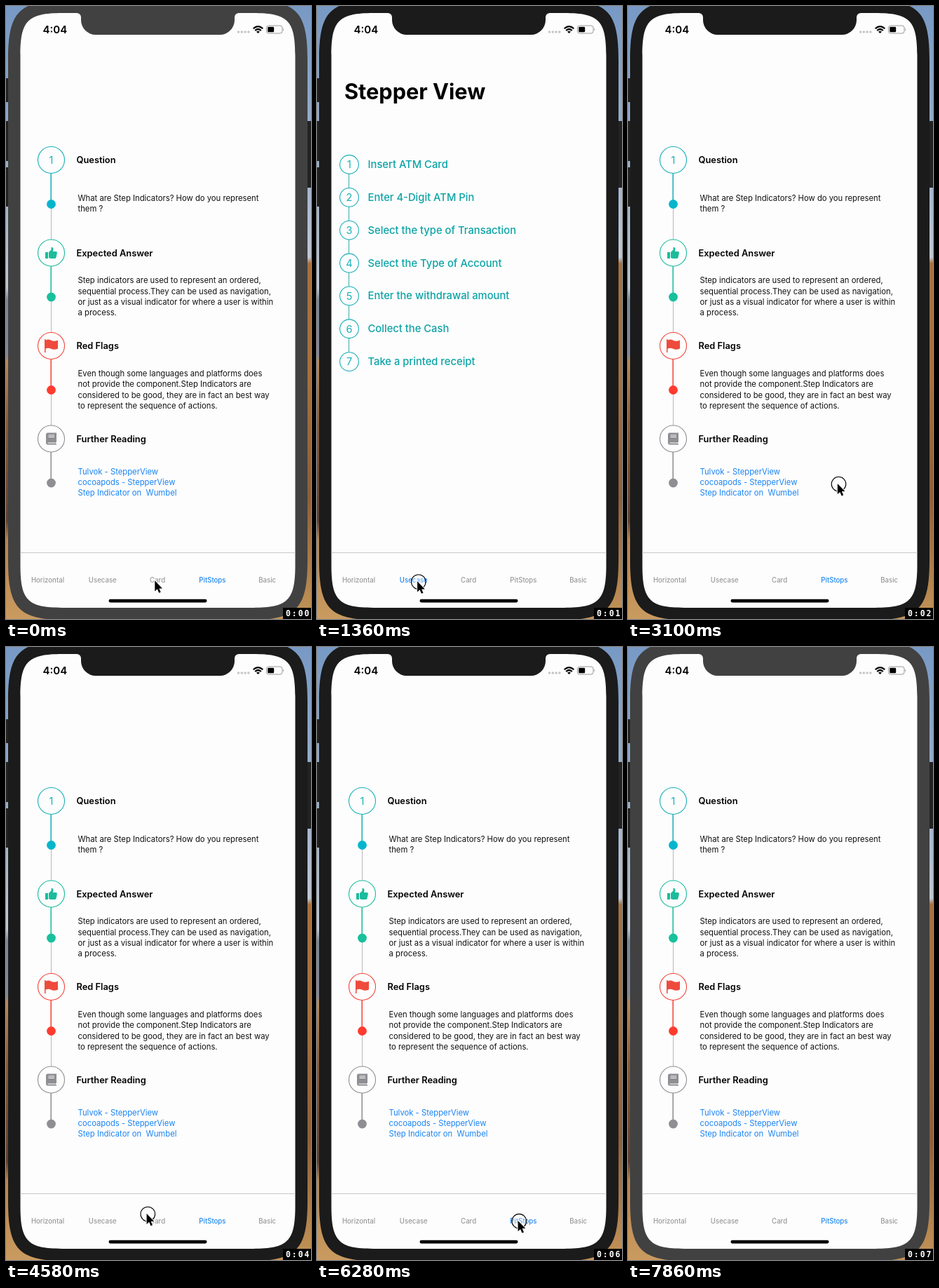
Write an HTML page that moves like this. It is 435 by 874 pixels and loops after 7.92 s.

```html
<!DOCTYPE html>
<html lang="en">
<head>
<meta charset="utf-8">
<title>Step indicator demo</title>
<style>
html, body { margin: 0; width: 100%; height: 100%; overflow: hidden; }
svg { display: block; width: 435px; height: 874px; }
text { font-family: Inter, "Open Sans", sans-serif; white-space: pre; }
.title { font-size: 30.7px; font-weight: 700; }
.label { font-size: 14.75px; font-weight: 500; fill: #0ba3a6; }
.head { font-size: 12.85px; font-weight: 600; }
.body { font-size: 11.28px; fill: #111; }
.link { font-size: 11.28px; fill: #1a84f5; }
.num { font-size: 14.5px; text-anchor: middle; fill: #18b0b8; }
.tab { font-size: 9.65px; font-weight: 500; text-anchor: middle; fill: #999; }
.tab.on { fill: #1d86f3; }
.time { font-size: 15px; font-weight: 600; }
.clock { font: bold 11.5px "DejaVu Sans Mono", monospace; letter-spacing: 1.9px; fill: #fff; }
.line { fill: none; }
</style>
</head>
<body>
<svg viewBox="0 0 435 874" xmlns="http://www.w3.org/2000/svg">
  <defs>
    <linearGradient id="left" x2="0" y2="1">
      <stop offset="0" stop-color="#7799c4"/><stop offset=".3" stop-color="#a0b2ca"/>
      <stop offset=".46" stop-color="#c0c8d3"/><stop offset=".48" stop-color="#7d879a"/>
      <stop offset=".57" stop-color="#858897"/><stop offset=".58" stop-color="#b98a5b"/>
      <stop offset=".68" stop-color="#8a5c38"/><stop offset=".84" stop-color="#5d4030"/>
      <stop offset=".87" stop-color="#b98550"/><stop offset="1" stop-color="#c99b60"/>
    </linearGradient>
    <linearGradient id="right" x2="0" y2="1">
      <stop offset="0" stop-color="#7799c4"/><stop offset=".3" stop-color="#a6b7ce"/>
      <stop offset=".41" stop-color="#bfc8d3"/><stop offset=".42" stop-color="#a7713f"/>
      <stop offset=".6" stop-color="#a8703d"/><stop offset=".8" stop-color="#8e5f38"/>
      <stop offset="1" stop-color="#c39458"/>
    </linearGradient>
  </defs>
  <rect width="218" height="874" fill="url(#left)"/>
  <rect x="217" width="218" height="874" fill="url(#right)"/>
  <path fill="#222" d="M0 103H5V137H0ZM0 164H5V221H0ZM0 230H5V286H0ZM428 164H435V259H428Z"/>
  <g id="bezel">
    <path id="body"/>
    <path id="screen" fill="#fdfdfd"/>
    <path d="M101 9.5V10A6 6 0 0 1 107 16V20A21 21 0 0 0 128 41H305A21 21 0 0 0 326 20V16A6 6 0 0 1 332 10V9.5Z"/>
  </g>
  <text class="time" x="52.5" y="39">4:04</text>
  <g fill="#c6c6c6"><circle cx="331.5" cy="37" r="1.8"/><circle cx="336.3" cy="37" r="1.8"/><circle cx="341.1" cy="37" r="1.8"/><circle cx="345.9" cy="37" r="1.8"/></g>
  <g class="line" stroke="#000" stroke-width="2.2">
    <path d="M352.7 32.2Q359.5 26 366.3 32.2M355.2 35Q359.5 31 363.8 35"/>
    <path d="M357 36.5Q359.5 34.8 362 36.5L359.5 39Z" fill="#000" stroke="none"/>
  </g>
  <rect x="371.5" y="28" width="22.5" height="11" rx="3" fill="none" stroke="#999"/>
  <rect x="373.2" y="29.7" width="9" height="7.6" rx="1.3"/>
  <path d="M395.3 31.5Q397.3 33.5 395.3 35.5Z" fill="#999"/>
  <g id="pages"></g>
  <path d="M20.5 779.5H412.5" stroke="#c9c9c9"/>
  <g id="tabs"></g>
  <rect x="146.5" y="845.8" width="140" height="4.6" rx="2.3"/>
  <g id="cursor">
    <circle id="ring" r="10.3" fill="#fff" fill-opacity=".3" stroke="#000" stroke-width="1.1"/>
    <path d="M-1.7-.7V14.5L1.8 11.3L4.2 16.8L6.7 15.7L4.4 10.4H9Z" stroke="#fff" stroke-width="1.6" paint-order="stroke"/>
  </g>
  <rect x="395" y="858" width="40" height="16"/>
  <text class="clock" id="clock" x="399" y="870"></text>
</svg>
<script>
const $ = id => document.getElementById(id);
const text = (cls, x, y, s) => `<text class="${cls}" x="${x}" y="${y}">${s}</text>`;
const circle = (x, y, r, attrs) => `<circle cx="${x}" cy="${y}" r="${r}" ${attrs}/>`;
const line = (x, y1, y2, color, w = 1) => `<path d="M${x} ${y1}V${y2}" stroke="${color}" stroke-width="${w}"/>`;
const at = (x, y, s) => `<g transform="translate(${x} ${y})">${s}</g>`;

// Rectangle whose corners ease into the sides instead of being plain arcs
function smoothRect(x, y, w, h, r) {
  const e = r * 1.53, k = e * .823, m = e - k;
  return `M${x + e} ${y}h${w - 2 * e}c${k} 0 ${e} ${m} ${e} ${e}v${h - 2 * e}c0 ${k} ${-m} ${e} ${-e} ${e}` +
    `h${2 * e - w}c${-k} 0 ${-e} ${-m} ${-e} ${-e}v${2 * e - h}c0 ${-k} ${m} ${-e} ${e} ${-e}Z`;
}
$("body").setAttribute("d", smoothRect(3, -8, 427, 883.5, 56));
$("screen").setAttribute("d", smoothRect(20.5, 10, 392, 848, 39.3));

// Icons, centred on 0,0
const thumb = `<path fill="#1abc9c" d="M-8.5-1H-4.5V8H-8.5ZM-3.5-1L0-4.5V-8Q3-8.5 3-5L2.4-2H7Q8.8-1.6 8.3.5L7 6.5Q6.6 8 5 8H-1L-3.5 7Z"/>`;
const flag = `<path fill="#ee4b3d" d="M-9.5-9.5H-8V-8Q-4-10 0-7.8T9.5-8V4Q4 6.3 0 4.3T-8 4V9.5H-9.5Z"/>`;
const book = `<path fill="#8e8e93" d="M-5.5-8.5H7.5V5H6.3V7H7.5V8.5H-5Q-7.5 8.5-7.5 5.5V-6Q-7.5-8.5-5.5-8.5Z"/><path d="M-4-5H4.5M-4-2.5H4.5M-5 6H6" stroke="#fdfdfd" stroke-width="1.2"/>`;
const outline = (d, w = 1.1) => `<path class="line" stroke="#12a7ab" stroke-width="${w}" d="${d}"/>`;
const bankCard = outline("M-9-8.5H9Q10-8.5 10-7.5V7.5Q10 8.5 9 8.5H-9Q-10 8.5-10 7.5V-7.5Q-10-8.5-9-8.5ZM-7 2H0M-7 5H-3") +
  `<path fill="#12a7ab" d="M-10-5H10V-1.5H-10Z"/>`;
const receipt = outline("M-6 8V-10.5Q-6-14-9-14T-10.5-9H-6M-9-14H5Q7.5-14 7.5-11V4M-6 8H-10Q-10 13.5-7 13.5H4Q1.5 12 2 8H-6M-3-7H-1M1-7H5M-3-2.5H-1M1-2.5H5M-3 2H-1M1 2H5M10 6.5Q5.5 5.5 6 8T9.5 10T6 13M8 5V14.5");
const cash = outline("M-4-9.5L10-4L7 5L-7-.5ZM-7-.5L-8 2L-2 4.5M6 7L7 5M4-2.2A2.4 2.4 0 1 1-.8-2.2A2.4 2.4 0 1 1 4-2.2" +
  "M-4 5A2.5 2.5 0 1 1-9 5A2.5 2.5 0 1 1-4 5M2 7A2.6 2.6 0 1 1-3.2 7A2.6 2.6 0 1 1 2 7", .75);

function cardPage() {
  const cards = [["Insert ATM Card", bankCard], ["Select transaction and enter pin", receipt],
    ["Collect Cash", cash], ["Select type of Account", cash]];
  return text("title", 39, 133, "StepperView") + line(45.5, 239, 493, "#4ba3aa") +
    cards.map(([label, icon], i) => {
      const y = 239 + i * 84.7;
      return circle(46, y, 5.8, 'fill="#00b4ca"') +
        `<rect class="line" x="63.5" y="${y - 28.5}" width="296" height="57" rx="6.5" stroke="#bdbdbd"/>` +
        at(81, y, icon) + text("label", 101, y + 5, label);
    }).join("");
}

function usecasePage() {
  const steps = ["Insert ATM Card", "Enter 4-Digit ATM Pin", "Select the type of Transaction",
    "Select the Type of Account", "Enter the withdrawal amount", "Collect the Cash", "Take a printed receipt"];
  return text("title", 39, 133, "Stepper View") + line(45.5, 226, 507, "#3fa9ae") +
    steps.map((label, i) => {
      const y = 226 + i * 46.85;
      return circle(46, y, 13.4, 'fill="#fdfdfd" stroke="#18b0b8" stroke-width="1.1"') +
        text("num", 46, y + 5.3, i + 1) + text("label", 72.5, y + 5, label);
    }).join("");
}

function pitStopsPage() {
  const stops = [
    ["Question", "#18b0b8", "#06b5cc", text("num", 0, 5.3, 1), 277.8,
      ["What are Step Indicators? How do you represent", "them ?"]],
    ["Expected Answer", "#1abc9c", "#18c09c", thumb, 395.4,
      ["Step indicators are used to represent an ordered,", "sequential process.They can be used as navigation,",
        "or just as a visual indicator for where a user is within", "a process."]],
    ["Red Flags", "#f5443a", "#ff3b30", flag, 528,
      ["Even though some languages and platforms does", "not provide the component.Step Indicators are",
        "considered to be good, they are in fact an best way", "to represent the sequence of actions."]],
    ["Further Reading", "#8e8e93", "#8e8e93", book, 667.5,
      ["Tulvok - StepperView", "cocoapods - StepperView", "Step Indicator on  Wumbel"]]
  ];
  return line(64.5, 240, 680, "#b7b7be") +
    stops.map(([head, stroke, fill, icon, base, lines], i) => {
      const y = 219.5 + i * 132.5;
      return line(64.2, y + 19, y + 63, stroke, 1.5) +
        circle(64.5, y, 19, `fill="#fdfdfd" stroke="${stroke}" stroke-width="1.1"`) +
        circle(64.5, y + 63, 6.4, `fill="${fill}"`) + at(64.5, y, icon) +
        text("head", 100.5, y + 4.7, head) +
        lines.map((s, n) => text(i == 3 ? "link" : "body", 102.5, base + n * 15.3, s)).join("");
    }).join("");
}

const pages = { Usecase: usecasePage, Card: cardPage, PitStops: pitStopsPage };
$("pages").innerHTML = Object.keys(pages).map(k => `<g id="page${k}">${pages[k]()}</g>`).join("");
const tabs = ["Horizontal", "Usecase", "Card", "PitStops", "Basic"];
$("tabs").innerHTML = tabs.map((s, i) => text("tab", 59.5 + i * 78.3, 822, s)).join("");

const LOOP = 7920;
const switches = [[0, "PitStops"], [180, "Card"], [1360, "Usecase"], [2460, "PitStops"], [5050, "Card"], [6220, "PitStops"]];
const ticks = [1060, 2080, 3160, 4120, 5180, 6220, 7110];
const path = [ // time, x, y
  [0, 214, 820], [470, 214, 820], [610, 180, 816], [730, 157.3, 814.5], [900, 148, 818], [1120, 144.8, 821],
  [1690, 144.8, 821], [1950, 225, 822], [2170, 283, 824], [2230, 285.5, 824.7],
  [2660, 285.5, 824.7], [2860, 300.5, 698.5], [3040, 300.5, 698.5], [3100, 300.5, 682], [3370, 303, 580],
  [3810, 303, 580], [4100, 280, 670], [4400, 222, 790], [4580, 202.3, 808.5],
  [4650, 202.3, 808.5], [4880, 209.5, 822], [5430, 209.5, 822], [5690, 286.3, 817],
  [5850, 286.3, 817], [5930, 288.3, 818.7], [6660, 288.3, 818.7], [6930, 341.5, 862],
  [7080, 341.5, 862], [7450, 348, 895]
];

function position(t) {
  const i = path.findIndex(p => p[0] > t);
  if (i < 0) return null;
  const [a, b] = [path[i - 1], path[i]], k = (t - a[0]) / (b[0] - a[0]);
  return [a[1] + (b[1] - a[1]) * k, a[2] + (b[2] - a[2]) * k];
}

function draw(now) {
  const t = now % LOOP;
  const page = switches.filter(s => s[0] <= t).pop()[1];
  for (const k in pages) $("page" + k).style.display = k == page ? "" : "none";
  [...$("tabs").children].forEach((el, i) => el.classList.toggle("on", tabs[i] == page));
  $("bezel").setAttribute("fill", t < 70 || t >= 7810 ? "#414141" : "#1b1b1b");
  $("clock").textContent = "0:0" + ticks.filter(s => s <= t).length;
  const p = position(t);
  $("cursor").style.display = p ? "" : "none";
  if (p) $("cursor").setAttribute("transform", `translate(${p})`);
  $("ring").style.display = t < 70 ? "none" : "";
}

const start = performance.now();
function frame() {
  draw(performance.now() - start);
  requestAnimationFrame(frame);
}
frame();
</script>
</body>
</html>
```
